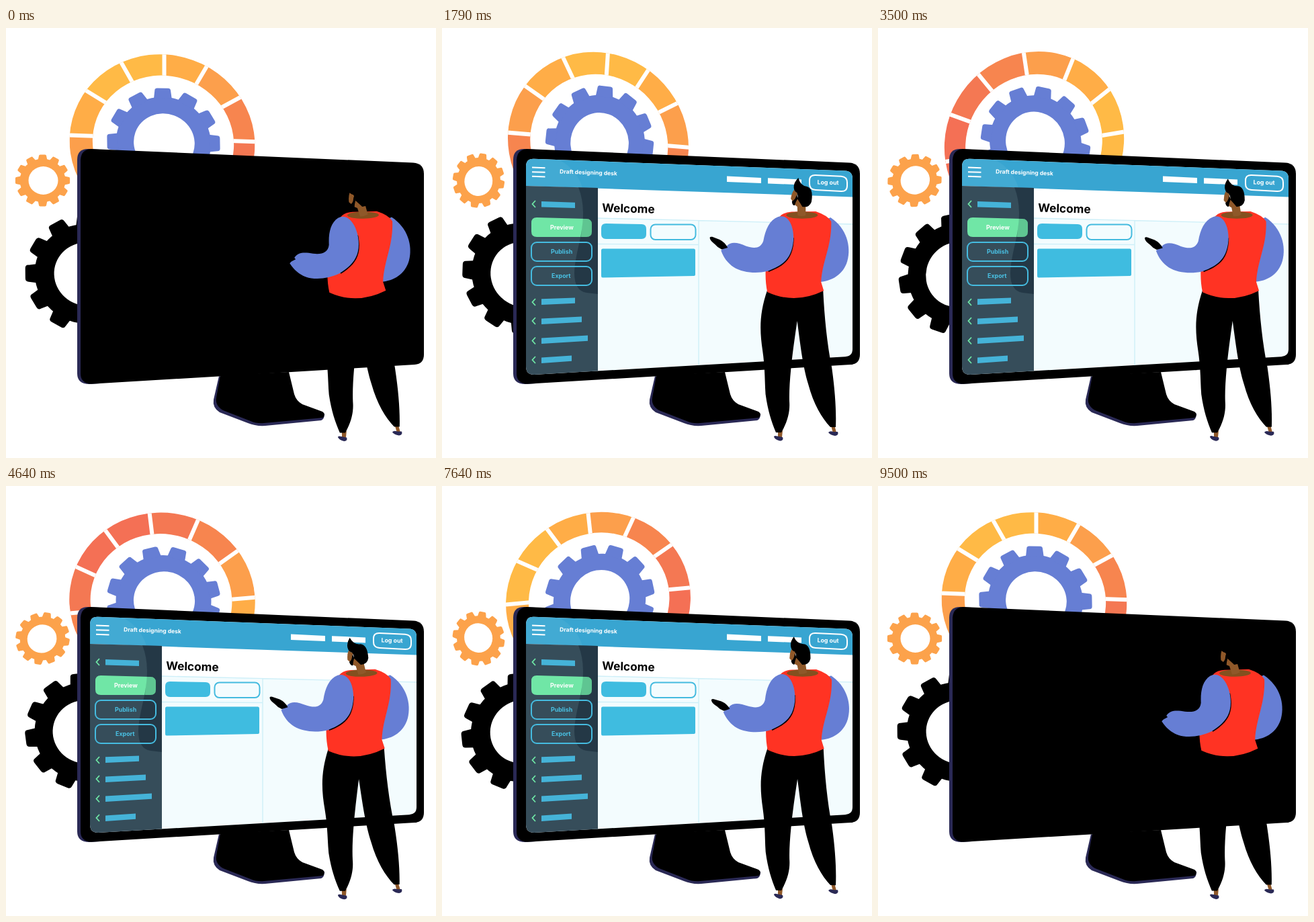
Write an HTML page that moves like this. It is 640 by 640 pixels and loops after 9570 ms.

```html
<!DOCTYPE html>
<html lang="en">
<head>
<meta charset="utf-8">
<style>
  html, body { margin: 0; width: 100%; height: 100%; overflow: hidden; background: #fff; }
  svg { display: block; width: 100vw; height: 100vh; }
  text { font-family: Inter, "Open Sans", sans-serif; font-weight: 700; }
  .skin { fill: #8f5829; }
  .blue { fill: #667ed4; }
  .navy { fill: #2a2955; }
  .bar { fill: #45b3d8; }
  .line { fill: none; stroke: #cdeff8; stroke-width: 1.3; }
  .outline { fill: none; stroke: #45bbdf; stroke-width: 2; }
  .chevron { fill: none; stroke: #6ee6a5; stroke-width: 1.8; }
</style>
</head>
<body>
<svg viewBox="0 0 640 640">
  <defs>
    <clipPath id="screenClip">
      <path d="M125 206Q125 194 137 194.7L600 212.5Q611 213 611 224V478Q611 488.5 600 489.2L137 516Q125 516 125 504Z"/>
    </clipPath>
    <clipPath id="sideClip"><path d="M125 235L232 238V511L125 517Z"/></clipPath>
    <clipPath id="ringClip"><path id="ringShape" clip-rule="evenodd"/></clipPath>
  </defs>

  <g id="ring"></g>
  <g id="blueGear"></g>
  <g id="orangeGear"></g>
  <g id="blackGear"></g>

  <path class="navy" d="M317 518L309 553Q307 565 318 572L360 588Q372 593 386 592L469 584Q474 582 474 574Z"/>
  <path d="M319 517L421 512L429 545Q432 555 441 560L471 571Q476 574 472 580L384 588Q373 589 364 585L323 569Q311 562 313 550Z"/>
  <path class="navy" d="M106 196Q106 180 122 180L140 181V529L124 530Q106 530 106 514Z"/>
  <path d="M111 196Q112 181 126 180L606 200.5Q622 201.5 622 217V486Q622 500 608 501L127 529.8Q111 529 111 514Z"/>

  <g id="screen" clip-path="url(#screenClip)">
    <path fill="#f3fcfe" d="M125 190H611V520H125Z"/>
    <path fill="#fff" d="M232 236L611 250V292L232 283Z"/>
    <path class="line" d="M232 283L611 292M232 321.5L382 322.5M382 286.5V502"/>
    <path fill="#38a5d1" d="M125 190H611V251.5L125 235Z"/>
    <path fill="#fff" opacity=".05" d="M125 190H160C190 200 204 220 209 238L125 235Z"/>
    <path fill="#364d5a" d="M125 235L232 238V511L125 517Z"/>

    <path fill="none" stroke="#fff" stroke-width="2" d="M134 207.5L153.5 208.3M134 214.2L153.5 214.8M134 220.8L153.5 221.6"/>
    <text transform="translate(175 216.5) rotate(2)" font-size="8.5" fill="#fff">Draft designing desk</text>
    <path fill="#fff" d="M424 220.5L475 223V231L424 229ZM485 223.2L535 225.4V233.4L485 231.5Z"/>
    <path fill="none" stroke="#fff" stroke-width="2" d="M556 219L594 220.8Q603 221.5 603 230V235Q603 243.5 594 243L556 241Q547 240.5 547 232V227Q547 218.5 556 219Z"/>
    <text transform="translate(558.5 232.6) rotate(1.5)" font-size="8.8" fill="#fff">Log out</text>

    <path fill="#70e6a6" d="M141 282L215 284Q223 284.3 223 292V303Q223 311 215 311H141Q133 311 133 303V290Q133 282 141 282Z"/>
    <g id="menu"></g>
    <path clip-path="url(#sideClip)" fill="#0b1a28" opacity=".4" d="M203 237Q210 255 210 275C210 310 198 335 197 365Q197 391 215 394L233 396V236Z"/>
    <rect class="outline" x="133" y="319" width="90" height="28" rx="8"/>
    <rect class="outline" x="133" y="355" width="90" height="28" rx="8"/>
    <path fill="#70e6a6" opacity=".6" d="M209 284L215 284Q223 284.3 223 292V303Q223 311 215 311H207Z"/>
    <g font-size="8.9">
      <text x="161" y="300" fill="#fff">Preview</text>
      <text x="162" y="336" fill="#49c0e3">Publish</text>
      <text x="163" y="372" fill="#49c0e3">Export</text>
    </g>

    <text transform="translate(238 273.5) rotate(1.6)" font-size="17.2">Welcome</text>
    <path fill="#3fbce0" d="M244 291L297 292Q304 292 304 299V307Q304 314 297 314H244Q237 313.5 237 307V298Q237 291 244 291Z"/>
    <rect class="outline" x="310.5" y="292.5" width="67" height="22.5" rx="7"/>
    <path fill="#3fbce0" d="M239 328.5H375Q377 328.5 377 331V367Q377 369 375 369L239 371.5Q237 371.5 237 369V331Q237 328.5 239 328.5Z"/>
  </g>

  <g id="person">
    <path class="skin" d="M500 599H507L506 609H500ZM579 592L584 591L587 602L582 603Z"/>
    <path class="navy" d="M494 608.5Q494 606 499 607.5L507 609Q509 614 503 614.5Q496 613 494 608.5ZM575 602Q577 599 583 601L589 601Q591 606 585 607Q578 606 575 602Z"/>
    <path d="M484 390C472 425 472.5 450 477 480C481 508 480 525 481.5 545C485 570 490 585 497 602H505C515 585 518 570 517 556C516 525 522 480 528.5 436C533 470 537 505 545 530C553 560 565 580 578 594H586C587 570 585 540 580 505C573 470 569 430 567 390Z"/>
    <path class="blue" d="M560 290L578 282C602 298 609 325 603 347C597 367 580 377 561 378Z"/>
    <path fill="#ff3323" d="M502 281Q508 274 520 273.5L556 273Q574 279 579 288C580 325 566 345 564 378L568 391Q525 412 484 393Q480 375 482 350Z"/>
    <ellipse cx="535.5" cy="278.5" rx="23.5" ry="5.2" fill="#84501f"/>
    <g id="head">
      <path class="skin" d="M527 252L522 261L528.5 266L529 279Q535 281 541 279V264L533 254Z"/>
      <path class="skin" d="M523.5 241L529 246L526 256L521.5 258L518.8 254Q520 246 523.5 241Z"/>
      <path d="M530 223Q522 231 523.5 239Q524 243 528 245Q530 250 528.5 254Q531 258 533 261L536 266Q546 268 549.5 259Q553 239 543 236Q533 235 530 223Z"/>
      <path d="M528 248L529 254Q526 259 524.5 264Q521 264.500 520.5 258Q525 256 526.500 251Z"/>
    </g>
    <g id="arm">
      <path d="M523.5 312C523 343 510 354 486 363L482 355Z"/>
      <path class="blue" d="M500 281C515 276 524 295 522.8 316C520.5 343 507.5 353.5 484 362C467 366 447 364 434 356C425 350 419 342 415 331L424 324C431 317 441 320 452 324.5C465 329 474 328 478 317C481 300 487 286 500 281Z"/>
      <path d="M398.5 313.5Q397.5 310 402 311L413 315Q421 319 425 327L416 329.5Q410 327 406 322Q399 317 398.5 313.5Z"/>
    </g>
  </g>
</svg>

<script>
const LOOP = 9570, FPS = 14, SPIN = 9530;
const el = id => document.getElementById(id);
const smooth = p => p * p * (3 - 2 * p);

function keyed(keys, t) {
  let i = 1;
  while (i < keys.length - 1 && t > keys[i][0]) i++;
  const [t0, a] = keys[i - 1], [t1, b] = keys[i];
  return a + (b - a) * smooth(Math.min(1, Math.max(0, (t - t0) / (t1 - t0))));
}

// Gears are slightly flattened discs that turn rigidly.
function gear(id, color, body, hole, tip, w, c, tilt, flat) {
  const base = w + 1.5, r0 = body - 3;
  const tooth = `M${r0} ${-base}L${tip - c} ${-w}Q${tip} ${-w} ${tip} ${c - w}V${w - c}Q${tip} ${w} ${tip - c} ${w}L${r0} ${base}Z`;
  let teeth = "";
  for (let a = 0; a < 360; a += 30) teeth += `<path d="${tooth}" transform="rotate(${a - tilt})"/>`;
  el(id).innerHTML = `<g transform="rotate(${tilt}) scale(1 ${flat})" fill="${color}">
    <circle r="${body}"/>${teeth}<circle cx="1" r="${hole}" fill="#fff"/></g>`;
}

function ellipse(cx, cy, rx, ry, tilt) {
  const a = tilt * Math.PI / 180, dx = rx * Math.cos(a), dy = rx * Math.sin(a);
  const arc = `A${rx} ${ry} ${tilt} 1 1 `;
  return `M${cx - dx} ${cy - dy}${arc}${cx + dx} ${cy + dy}${arc}${cx - dx} ${cy - dy}Z`;
}

function buildRing() {
  el("ringShape").setAttribute("d", ellipse(0, 0, 138.4, 131.3, 15) + ellipse(1.5, 0, 105.5, 100, 15));
  const half = ["#ffba46", "#ffad47", "#fc9f4c", "#f7854f", "#f47853", "#f47055"];
  const colors = [...half, ...half.slice().reverse()];
  const hub = [3, -6.5];
  const spoke = deg => {
    const a = deg * Math.PI / 180, x = Math.cos(a);
    return `${hub[0] + 180 * x} ${hub[1] + 180 * (Math.sin(a) + 0.035 * x)}`;
  };
  let wedges = "", gaps = "";
  colors.forEach((color, i) => {
    const from = 30 * i - 120;
    wedges += `<path fill="${color}" d="M${hub}L${spoke(from)}L${spoke(from + 30)}Z"/>`;
    gaps += `M${hub}L${spoke(from)}`;
  });
  el("ring").innerHTML = `<g clip-path="url(#ringClip)">${wedges}<path d="${gaps}" stroke="#fff" stroke-width="6"/></g>`;
}

function buildMenu() {
  // top of bar, width, slope, middle of chevron
  const rows = [[258, 50, 1.8, 262], [403.3, 50, -1.8, 408], [432.5, 60, -3, 436], [461.5, 69, -4, 465.5], [490.5, 45, -3, 494]];
  el("menu").innerHTML = rows.map(([y, w, s, m]) =>
    `<path class="bar" d="M148 ${y}l${w} ${s}v8.3L148 ${y + 8.6}Z"/>
     <path class="chevron" d="M139 ${m - 5}L134.5 ${m}L139 ${m + 5}"/>`).join("");
}

const spins = [["ring", 232.5, 171, 1], ["blueGear", 234.5, 170.5, 2], ["orangeGear", 54.5, 227, 3], ["blackGear", 119.5, 366, 1]];
const sway = [[0, -0.7], [2400, 0.2], [5800, -1.6], [7500, 0.2], [LOOP, -0.7]];
const nod = [[0, -15], [1790, 0], [3500, -9], [4640, -13], [6070, -11], [7640, -9], [LOOP, -15]];
const reach = [[0, -12], [1700, 0], [6500, 0], [LOOP, -12]];
const glow = [[0, 0], [1400, 1], [8200, 1], [9500, 0]];
const turns = [[0, 0], [SPIN, 360]];

const place = (id, value) => el(id).setAttribute("transform", value);

function draw(now) {
  const step = Math.floor((now % LOOP + 5) * FPS / 1000);
  const t = Math.min(step, 133) * 1000 / FPS;
  const turn = keyed(turns, t);
  for (const [id, x, y, rate] of spins) place(id, `translate(${x} ${y}) rotate(${turn * rate})`);
  place("person", `rotate(${keyed(sway, t)} 540 610)`);
  place("head", `rotate(${keyed(nod, t)} 535 272)`);
  place("arm", `rotate(${keyed(reach, t)} 505 290)`);
  el("screen").setAttribute("opacity", keyed(glow, t));
}

buildRing();
buildMenu();
gear("blueGear", "#667ed4", 71, 45.6, 84.5, 12, 4, 20, 0.95);
gear("orangeGear", "#fca24b", 34, 22, 40.6, 5.6, 2.2, 0, 0.95);
gear("blackGear", "#000", 77, 49, 91, 13, 5, 15, 0.96);

const start = performance.now();
function tick() {
  draw(performance.now() - start);
  requestAnimationFrame(tick);
}
tick();
</script>
</body>
</html>
```
